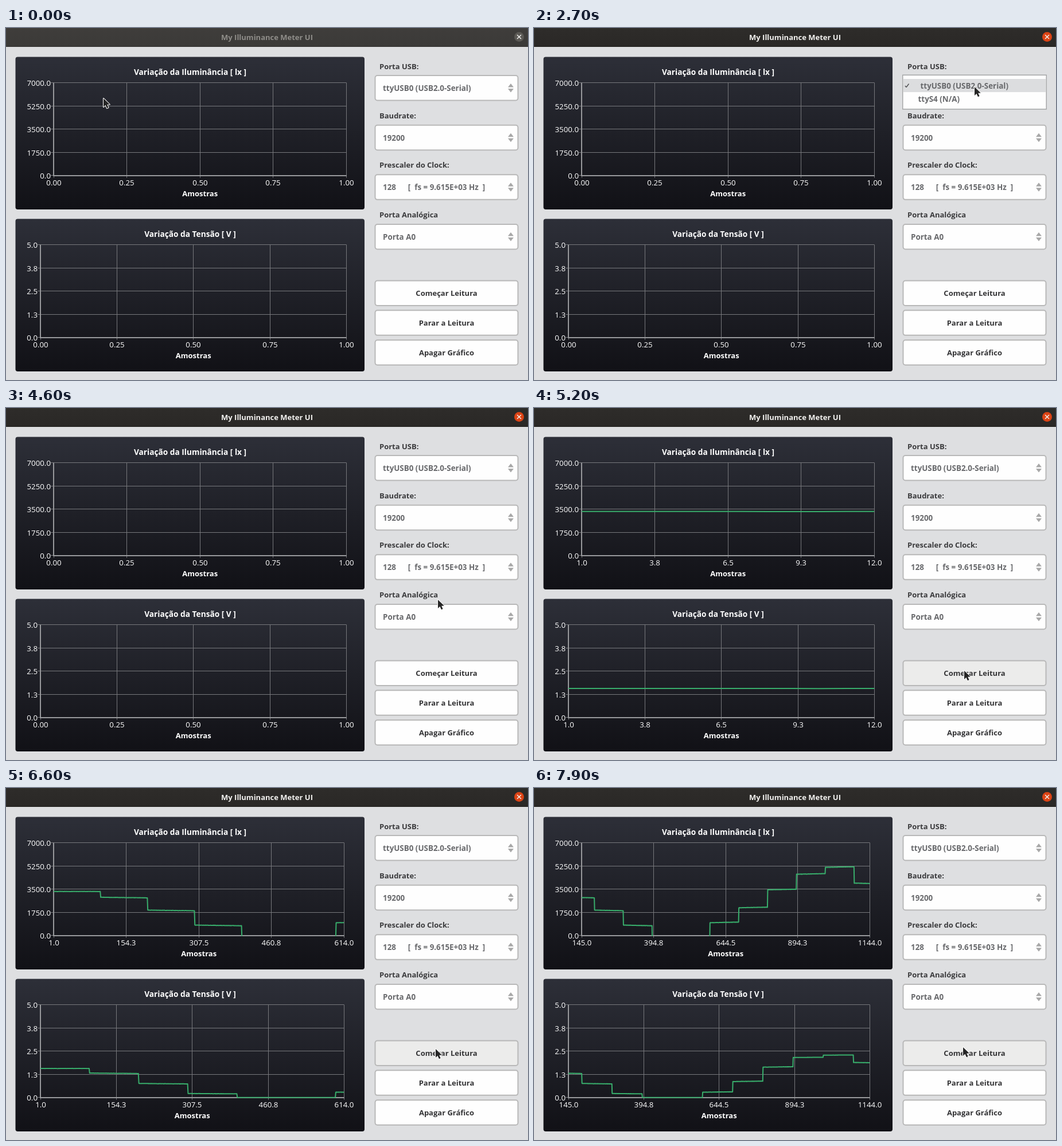
These frames come from a looping animation (910x615 px, 8 s). An HTML page with a canvas:

```html
<!DOCTYPE html>
<html lang="pt">
<head>
<meta charset="utf-8">
<title>My Illuminance Meter UI</title>
<style>
html, body { margin: 0; width: 100%; height: 100%; overflow: hidden; background: #dedfe1; }
canvas { display: block; }
</style>
</head>
<body>
<canvas id="stage" width="910" height="615"></canvas>
<script>
const ctx = document.getElementById('stage').getContext('2d');
const LOOP = 8000, STEP = 100;
const POPUP_OPEN = 2700, POPUP_CLOSE = 4100, READING = 5200;
const WINDOW = 1000, PLATEAU = 100;

const FAMILY = '"Open Sans", "Noto Sans", sans-serif';
const BOLD = 'bold 13px ' + FAMILY;
const VALUE = 'bold 13.4px ' + FAMILY;
const HEAD = 'bold 13.7px ' + FAMILY;
const TICK = '13.3px ' + FAMILY;

// Pointer moves: begin, end, x, y.
const HOME = [169, 122];
const MOVES = [
  [500, 600, 598, 43], [700, 900, 573, 54], [1000, 1500, 784, 98], [1500, 1700, 767, 102],
  [2900, 3300, 757, 128], [3300, 3500, 754, 100], [4000, 4400, 752, 320],
  [4500, 5000, 749, 458], [6000, 7200, 747, 452]
];
// Time, samples on the axis, samples plotted ahead of it.
const READS = [[READING, 12, 0], [6000, 333, 8], [7200, 894, 0], [7900, 1144, 11]];

// Light level of each plateau; the sensor voltage follows from it.
const LIGHT = [3325, 2867, 1894, 761, -300, -300, 990, 2119, 3476, 4652, 5171, 3930];
const FULL_LIGHT = 5185, FULL_VOLT = 2.29;

const CHARTS = [
  { title: 'Variação da Iluminância [ lx ]', left: 83, y: 50.5, max: 7000, value: lux => lux },
  { title: 'Variação da Tensão [ V ]', left: 60, y: 333.5, max: 5, value: voltage }
];
const COMBOS = [
  ['Porta USB:', 'ttyUSB0 (USB2.0-Serial)'],
  ['Baudrate:', '19200'],
  ['Prescaler do Clock:', '128      [  fs = 9.615E+03 Hz  ]'],
  ['Porta Analógica', 'Porta A0']
];
const BUTTONS = ['Começar Leitura', 'Parar a Leitura', 'Apagar Gráfico'];

const clamp = v => Math.min(1, Math.max(0, v));
const mix = (a, b, f) => a + (b - a) * f;
const smooth = u => u * u * (3 - 2 * u);

function noise(n) {
  const v = Math.sin(n * 127.1) * 43758.5453;
  return v - Math.floor(v) - 0.5;
}

function lightAt(s) {
  const k = Math.min(LIGHT.length - 1, Math.floor((s - 1) / PLATEAU));
  const trend = k ? Math.sign(LIGHT[k] - LIGHT[k - 1]) : 0;
  const f = (s - 1) % PLATEAU / PLATEAU;
  return LIGHT[k] + trend * 45 * (f - 0.5) + noise(s) * 18;
}

function voltage(lux) {
  const u = clamp(lux / FULL_LIGHT);
  return FULL_VOLT * mix(u, smooth(u), 0.65);
}

function pointerAt(t) {
  let [x, y] = HOME;
  for (const [begin, end, toX, toY] of MOVES) {
    const f = smooth(clamp((t - begin) / (end - begin)));
    x = mix(x, toX, f);
    y = mix(y, toY, f);
  }
  return [Math.round(x), Math.round(y)];
}

function readsAt(t) {
  if (t < READING) return [0, 0];
  let [, shown, ahead] = READS[0];
  for (let i = 1; i < READS.length; i++) {
    const [begin] = READS[i - 1], [end, count, extra] = READS[i];
    const f = clamp((t - begin) / (end - begin));
    shown = mix(shown, count, f);
    ahead = mix(ahead, extra, f);
  }
  return [Math.round(shown), Math.round(shown + ahead)];
}

function text(str, x, cy, color, font = BOLD, align = 'left') {
  ctx.font = font;
  ctx.fillStyle = color;
  ctx.textAlign = align;
  ctx.fillText(str, x, cy + 4.5);
}

function line(x1, y1, x2, y2) {
  ctx.beginPath();
  ctx.moveTo(x1, y1);
  ctx.lineTo(x2, y2);
  ctx.stroke();
}

function polygon(...pts) {
  ctx.beginPath();
  for (let i = 0; i < pts.length; i += 2) ctx.lineTo(pts[i], pts[i + 1]);
  ctx.closePath();
}

function roundBox(x, y, w, h, r) {
  ctx.beginPath();
  ctx.roundRect(x, y, w, h, r);
  ctx.fill();
}

function shade(y, h, from, to) {
  const g = ctx.createLinearGradient(0, y, 0, y + h);
  g.addColorStop(0, from);
  g.addColorStop(1, to);
  ctx.fillStyle = g;
}

function field(y, fill) {
  ctx.fillStyle = '#b8b8b8';
  roundBox(642.5, y, 251, 45.5, 5);
  ctx.fillStyle = fill;
  roundBox(644.5, y + 2, 247, 41.5, 3);
}

function titleBar(active) {
  shade(0, 33, active ? '#2e2c2a' : '#3f3d3b', active ? '#2a2826' : '#3b3a38');
  ctx.fillRect(0, 0, 910, 33);
  ctx.fillStyle = active ? '#1d1c1a' : '#31302e';
  ctx.fillRect(0, 32, 910, 1);
  text('My Illuminance Meter UI', 455, 16.5, active ? '#f4f3f1' : '#8f8d89', BOLD, 'center');
  ctx.fillStyle = active ? '#dc4315' : '#5b5955';
  ctx.beginPath();
  ctx.arc(894.5, 15.5, 8.5, 0, 7);
  ctx.fill();
  ctx.strokeStyle = '#f2f1ef';
  ctx.lineWidth = 1.4;
  line(891, 12, 898, 19);
  line(898, 12, 891, 19);
}

function series(c, top, bottom, right, last) {
  const first = Math.max(1, last - WINDOW + 1);
  ctx.save();
  ctx.beginPath();
  ctx.rect(c.left, top, right - c.left, bottom - top + 1);
  ctx.clip();
  ctx.beginPath();
  for (let s = first; s <= last; s++) {
    ctx.lineTo(mix(c.left, right, (s - first) / (last - first)),
      mix(bottom, top, c.value(lightAt(s)) / c.max));
  }
  ctx.strokeStyle = '#38ad6b';
  ctx.lineWidth = 2;
  ctx.lineJoin = 'round';
  ctx.stroke();
  ctx.restore();
}

function chart(c, shown, drawn) {
  const top = c.y + 45.3, bottom = top + 161.9;
  shade(c.y, 266.5, '#2d2f38', '#111116');
  roundBox(16.5, c.y, 608.5, 266.5, 4);
  text(c.title, 321, c.y + 27, '#fff', HEAD, 'center');

  const lo = shown ? Math.max(1, shown - WINDOW + 1) : 0;
  const hi = shown || 1;
  const format = v => v.toFixed(shown ? 1 : 2);
  // Longer end labels push the plot edge inwards.
  const right = 593.5 - 4 * Math.max(0, format(hi).length - 4);

  for (let i = 0; i < 5; i++) {
    const f = i / 4;
    const x = Math.floor(mix(c.left, right, f)) + 0.5;
    const y = Math.floor(mix(top, bottom, f)) + 0.5;
    ctx.strokeStyle = '#77787c';
    ctx.lineWidth = 1;
    line(x, top, x, bottom + 4);
    line(c.left - 5, y, right, y);
    text((c.max * (1 - f)).toFixed(1), c.left - 5, y + 1, '#fff', TICK, 'right');
    text(format(mix(lo, hi, f)), x, bottom + 12.8, '#fff', TICK, 'center');
  }
  const base = Math.round(bottom);
  ctx.strokeStyle = '#98999c';
  ctx.lineWidth = 2;
  line(c.left, top, c.left, base + 1);
  line(c.left, base, right, base);
  text('Amostras', (c.left + right) / 2, bottom + 31.8, '#fff', BOLD, 'center');
  if (drawn > 1) series(c, top, bottom, right, drawn);
}

function combo([label, value], i) {
  const y = 82 + 86.67 * i;
  text(label, 651, 67.5 + 86.2 * i, '#3b3b3d');
  field(y, '#fefefe');
  text(value, 657, y + 23.5, '#68696c', VALUE);
  ctx.fillStyle = '#a8a8a8';
  for (const side of [-1, 1]) {
    const mid = y + 22.75 + side * 1.25;
    polygon(875, mid, 880, mid + side * 6.5, 885, mid);
    ctx.fill();
  }
}

function button(label, i, px, py) {
  const y = 440.5 + 51.85 * i;
  const hover = px > 643 && py > y && py < y + 45;
  field(y, hover ? '#ececeb' : '#fefefe');
  text(label, 768, y + 23, '#343436', BOLD, 'center');
}

function popup(pointerY) {
  ctx.fillStyle = '#a6a7a8';
  ctx.fillRect(642, 81.5, 252, 61);
  ctx.fillStyle = '#fefefe';
  ctx.fillRect(643.5, 83, 249, 58);
  ctx.fillStyle = '#dcdddf';
  ctx.fillRect(644, pointerY < 112 ? 89 : 112, 248, 23);
  ctx.strokeStyle = '#505154';
  ctx.lineWidth = 1.4;
  line(647, 101, 649, 103.5);
  line(649, 103.5, 653.5, 97.5);
  text('ttyUSB0 (USB2.0-Serial)', 673.5, 101, '#68696c', VALUE);
  text('ttyS4 (N/A)', 669.5, 124, '#68696c', VALUE);
}

function pointer(x, y) {
  ctx.save();
  ctx.translate(x + 1, y + 1);
  polygon(0, 0, 0, 15, 3.4, 11.8, 6, 17.2, 8.6, 16, 6.2, 10.8, 10.8, 10.6);
  ctx.lineJoin = 'round';
  ctx.strokeStyle = '#fff';
  ctx.lineWidth = 2;
  ctx.stroke();
  ctx.fillStyle = '#262626';
  ctx.fill();
  ctx.restore();
}

function draw(t) {
  const [px, py] = pointerAt(t);
  const [shown, drawn] = readsAt(t);
  ctx.fillStyle = '#dedfe1';
  ctx.fillRect(0, 0, 910, 615);
  titleBar(t >= POPUP_OPEN);
  CHARTS.forEach(c => chart(c, shown, drawn));
  COMBOS.forEach(combo);
  BUTTONS.forEach((label, i) => button(label, i, px, py));
  if (t >= POPUP_OPEN && t < POPUP_CLOSE) popup(py);
  pointer(px, py);
}

function tick() {
  const t = performance.now() % LOOP;
  draw(Math.floor(t / STEP) * STEP);
  requestAnimationFrame(tick);
}
tick();
</script>
</body>
</html>
```
